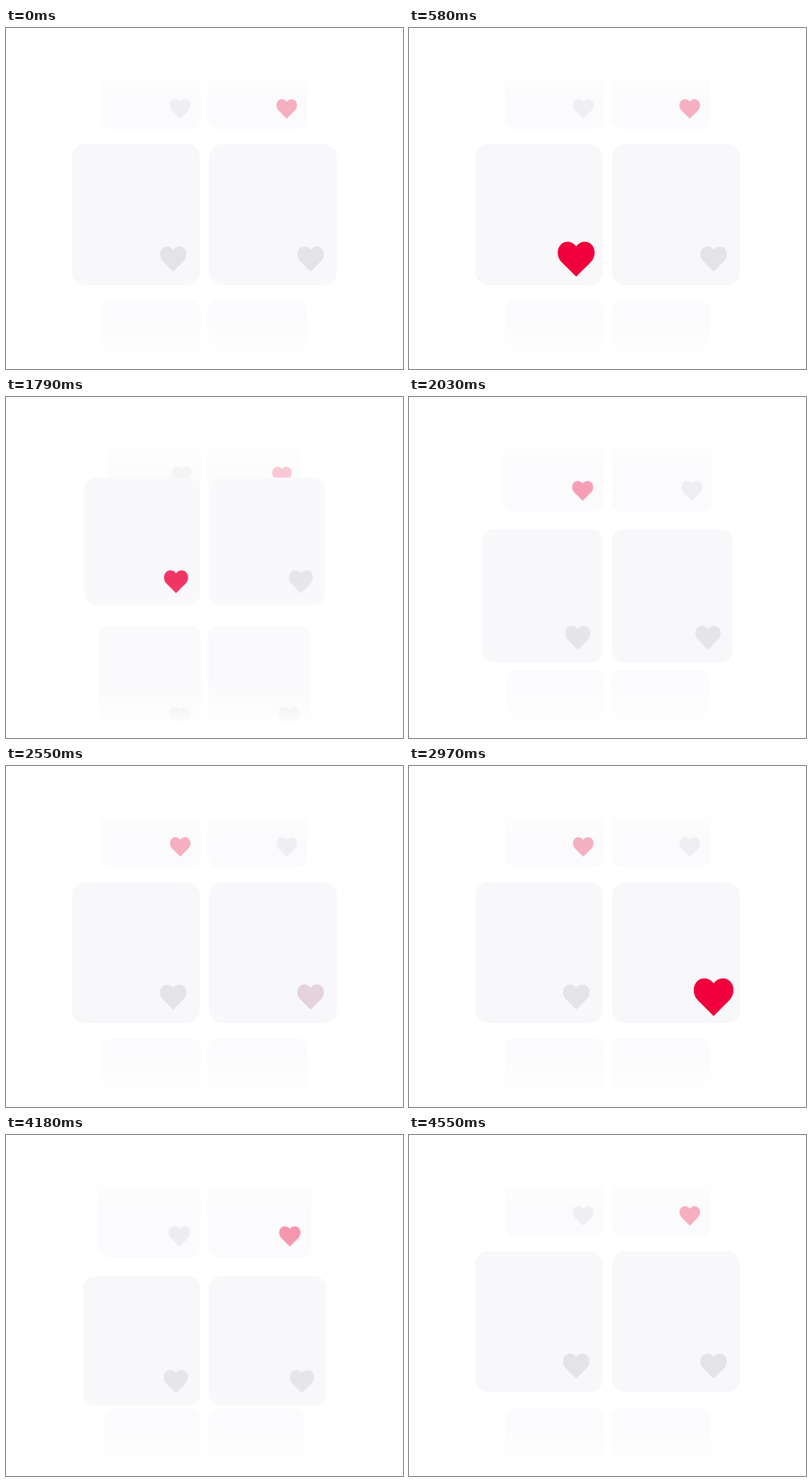
An HTML page that plays this animation: 492x422 px, repeating every 4.64 s.

```html
<!DOCTYPE html>
<html lang="en">
<head>
<meta charset="utf-8">
<title>Liked cards</title>
<style>
  html, body { margin: 0; width: 100%; height: 100%; overflow: hidden; background: #fff; }
  svg {
    display: block; width: 492px; height: 422px;
    -webkit-mask-image: linear-gradient(transparent 62px, #0008 65px, #000 90px, #000 360px, #0004 398px, transparent 404px);
    mask-image: linear-gradient(transparent 62px, #0008 65px, #000 90px, #000 360px, #0004 398px, transparent 404px);
  }

  :root {
    --loop: 4640ms;
    --card: #f8f8fb; --card-far: #fbfbfd;
    --grey: #e4e4e7; --grey-far: #efeff1;
    --red: #f0003c; --pink: #f6aec1;
  }

  /* Each row plays one scroll step, jumps back, then plays it again. */
  .row {
    opacity: var(--o0, 1);
    animation: shift var(--loop) ease-in-out infinite,
               size var(--loop) var(--size-ease, ease-in-out) infinite,
               fade var(--loop) ease-in-out infinite;
  }
  .row rect, .plain { animation: tint var(--loop) ease-in-out infinite; }

  .next   { --y0: 173.5px; --y1: 173.5px; --s0: .66; --s1: .775; --o0: 0; --o1: 1; }
  .leave  { --y0: -173.5px; --y1: -173.5px; --s0: .775; --s1: .665; --o0: 1; --o1: 0;
            --size-ease: cubic-bezier(.35, .2, .65, 1); }
  .enter  { --y0: 173.5px; --y1: 0px; --s0: .775; --s1: 1;
            --size-ease: cubic-bezier(.8, 0, .7, 1); }
  .centre { --y0: 0px; --y1: -173.5px; --s0: 1; --s1: .775;
            --size-ease: cubic-bezier(.35, .2, .65, 1); }

  .next rect, .leave rect { --c0: var(--card-far); --c1: var(--card-far); }
  .enter rect   { --c0: var(--card-far); --c1: var(--card); }
  .centre rect  { --c0: var(--card); --c1: var(--card-far); }
  .enter .plain { --c0: var(--grey-far); --c1: var(--grey); }

  .left  { translate: -38.8px 54.5px; }
  .right { translate: 131.5px 54.5px; }
  .centre .left  { animation: like-left var(--loop) ease-in-out infinite, pop-left var(--loop) ease-in-out infinite; }
  .centre .right { animation: like-right var(--loop) ease-in-out infinite, pop-right var(--loop) ease-in-out infinite; }
  .leave .left   { animation: second-half var(--loop) infinite; }
  .leave .right  { animation: first-half var(--loop) infinite; }

  @keyframes shift {
    0%, 33.84%, 46.35%, 80.82%, 93.33%, 100% { translate: 0 var(--y0); }
    46.34%, 93.32% { translate: 0 var(--y1); }
  }
  @keyframes size {
    0%, 33.84%, 46.35%, 80.82%, 93.33%, 100% { scale: var(--s0); }
    46.34%, 93.32% { scale: var(--s1); }
  }
  @keyframes fade {
    0%, 33.84%, 46.35%, 80.82%, 93.33%, 100% { opacity: var(--o0, 1); }
    46.34%, 93.32% { opacity: var(--o1, 1); }
  }
  @keyframes tint {
    0%, 33.84%, 46.35%, 80.82%, 93.33%, 100% { fill: var(--c0); }
    46.34%, 93.32% { fill: var(--c1); }
  }

  @keyframes like-left {
    0% { fill: var(--grey); }
    6.68% { fill: var(--grey); animation-timing-function: linear; }
    12.07%, 33.84% { fill: var(--red); }
    46.34% { fill: var(--pink); }
    46.35%, 80.82% { fill: var(--grey); }
    93.32% { fill: var(--grey-far); }
    93.33%, 100% { fill: var(--grey); }
  }
  @keyframes like-right {
    0%, 33.84% { fill: var(--grey); }
    46.34% { fill: var(--grey-far); }
    46.35% { fill: var(--grey); }
    54.53% { fill: var(--grey); animation-timing-function: linear; }
    60.34%, 80.82% { fill: var(--red); }
    93.32% { fill: var(--pink); }
    93.33%, 100% { fill: var(--grey); }
  }
  @keyframes pop-left {
    0%, 6.68%, 20.69%, 100% { scale: 1; }
    15.3% { scale: 1.5; }
  }
  @keyframes pop-right {
    0%, 54.53%, 70.9%, 100% { scale: 1; }
    63.8% { scale: 1.5; }
  }

  @keyframes first-half {
    0%, 46.34%, 93.33%, 100% { fill: var(--pink); }
    46.35%, 93.32% { fill: var(--grey-far); }
  }
  @keyframes second-half {
    0%, 46.34%, 93.33%, 100% { fill: var(--grey-far); }
    46.35%, 93.32% { fill: var(--pink); }
  }
</style>
</head>
<body>
<svg viewBox="0 0 492 422">
  <defs>
    <path id="heart" d="M0 16L-13 3C-17.5-1.5-17.5-9-13.5-12.8C-9.5-16.4-3.5-15.8 0-11C3.5-15.8 9.5-16.4 13.5-12.8C17.5-9 17.5-1.5 13 3Z"/>
  </defs>
  <g transform="translate(246 231)">
    <g class="row next">
      <rect x="-164" y="-87" width="158" height="174" rx="15"/>
      <rect x="6" y="-87" width="158" height="174" rx="15"/>
    </g>
    <g class="row leave">
      <rect x="-164" y="-87" width="158" height="174" rx="15"/>
      <rect x="6" y="-87" width="158" height="174" rx="15"/>
      <use class="left" href="#heart"/>
      <use class="right" href="#heart"/>
    </g>
    <g class="row enter">
      <rect x="-164" y="-87" width="158" height="174" rx="15"/>
      <rect x="6" y="-87" width="158" height="174" rx="15"/>
      <use class="plain left" href="#heart"/>
      <use class="plain right" href="#heart"/>
    </g>
    <g class="row centre">
      <rect x="-164" y="-87" width="158" height="174" rx="15"/>
      <rect x="6" y="-87" width="158" height="174" rx="15"/>
      <use class="left" href="#heart"/>
      <use class="right" href="#heart"/>
    </g>
  </g>
</svg>
</body>
</html>
```
